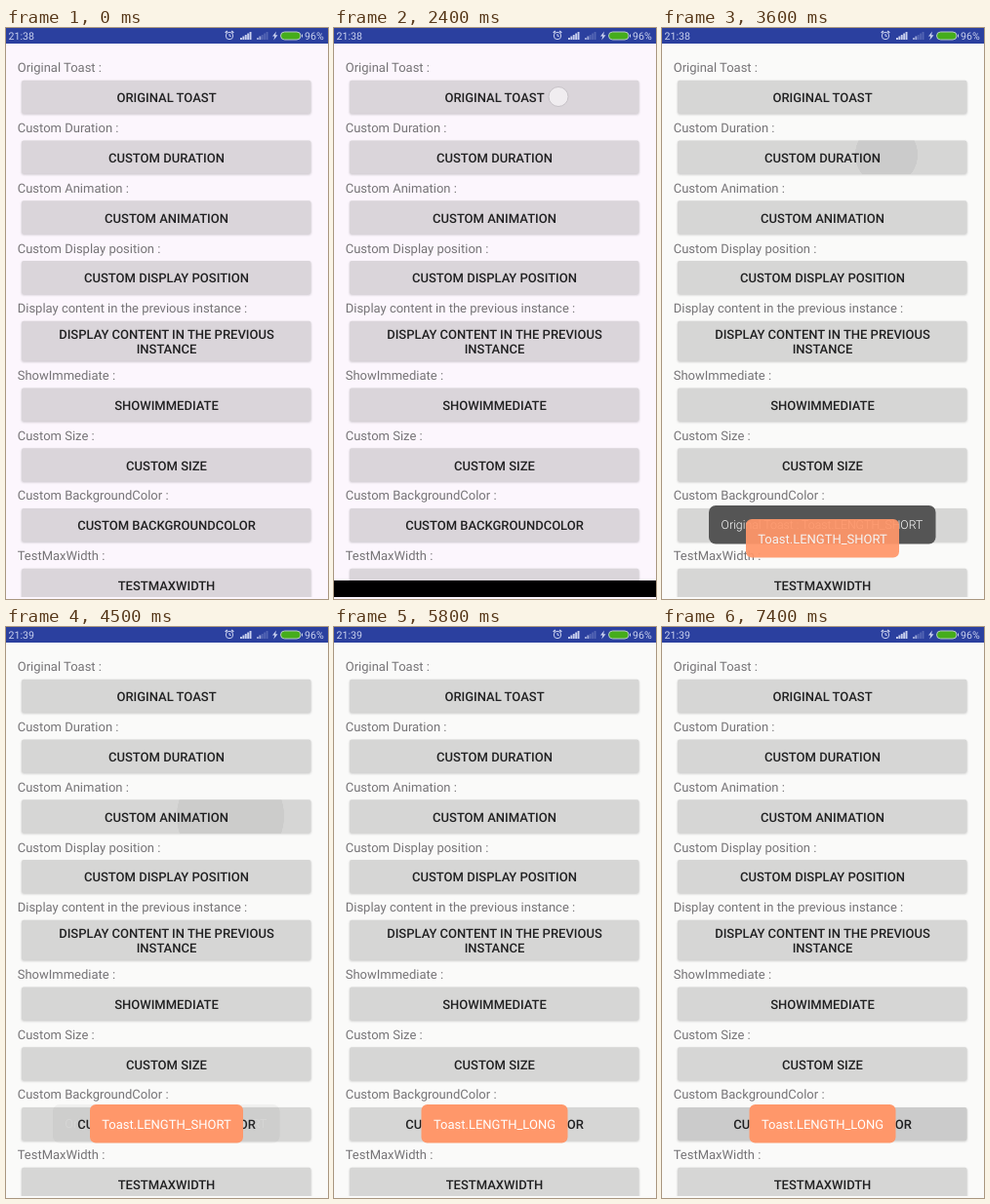
Write an HTML page that moves like this. It is 330 by 586 pixels and loops after 8 s.

```html
<!DOCTYPE html>
<html lang="en">
<head>
<meta charset="utf-8">
<title>Toast demo</title>
<style>
  html, body { margin: 0; width: 100%; height: 100%; overflow: hidden; background: #fafaf9; }
  svg { display: block; width: 330px; height: 586px; font: 13px Roboto, "Open Sans", sans-serif; text-rendering: geometricPrecision; }

  .page, .btn, .bar, .old, .new, .dot, .ripple, .plain, .short, .long, .press {
    animation: 8s step-end infinite;
  }
  .page { animation-name: page; }
  .btn { animation-name: btn; filter: drop-shadow(0 1px 1px rgba(0, 0, 0, .2)); }
  .bar { animation-name: bar; }
  .old { animation-name: old; }
  .new { animation-name: new; }
  .plain { animation-name: plain; }
  .short { animation-name: short; }
  .long { animation-name: long; }
  .press { animation-name: press; }
  .dot { animation-name: dot; animation-delay: calc(var(--start) - 8s); }
  .ripple { animation-name: ripple; animation-delay: calc(var(--start) - 8s); }

  .label { fill: #767477; }
  .cap { fill: #212122; font-weight: 500; text-anchor: middle; }
  .status { fill: #c9d0ee; font-size: 10.6px; }
  .mid { text-anchor: middle; fill: #fff; }
  .plain .mid { font-size: 12.3px; font-weight: 300; }

  @keyframes page { 0% { fill: #fcf6fd; } 31.25%, 100% { fill: #fafaf9; } }
  @keyframes btn { 0% { fill: #dad5da; } 31.25%, 100% { fill: #d6d6d5; } }
  @keyframes bar { 0% { opacity: 0; } 6.25% { opacity: 1; } 40%, 100% { opacity: 0; } }
  @keyframes old { 0% { opacity: 1; } 47.5%, 100% { opacity: 0; } }
  @keyframes new { 0% { opacity: 0; } 47.5%, 100% { opacity: 1; } }
  @keyframes press { 0% { opacity: 0; } 88.75% { opacity: .02; } 90% { opacity: .035; } 91.25%, 100% { opacity: .05; } }

  /* One touch, measured from its own start */
  @keyframes dot { 0% { opacity: 1; } 1.25% { opacity: .5; } 2.5%, 100% { opacity: 0; } }
  @keyframes ripple {
    0% { opacity: 0; transform: scale(0); }
    1.25% { opacity: .05; transform: scale(14); }
    2.5% { opacity: .05; transform: scale(32); }
    3.75% { opacity: .045; transform: scale(55); }
    5% { opacity: .035; transform: scale(110); }
    6.25% { opacity: .02; transform: scale(220); }
    7.5%, 100% { opacity: 0; transform: scale(220); }
  }

  @keyframes plain {
    0% { opacity: 0; }
    32.5% { opacity: .2; }
    33.75% { opacity: .5; }
    35% { opacity: .85; }
    36.25% { opacity: 1; }
    52.5% { opacity: .8; }
    53.75% { opacity: .55; }
    55% { opacity: .3; }
    56.25% { opacity: .06; }
    57.5%, 100% { opacity: 0; }
  }
  @keyframes short {
    0% { opacity: 0; transform: translateY(18px); }
    43.75% { opacity: .5; transform: translateY(18px); }
    45% { opacity: .94; transform: translateY(14px); }
    46.25% { opacity: 1; transform: translateY(8px); }
    47.5% { opacity: 1; transform: translateY(3px); }
    48.75% { opacity: 1; transform: none; }
    63.75% { opacity: .9; transform: translateY(3px); }
    65% { opacity: .6; transform: translateY(9px); }
    66.25% { opacity: .25; transform: translateY(15px); }
    67.5%, 100% { opacity: 0; transform: translateY(18px); }
  }
  @keyframes long {
    0% { opacity: 0; transform: translateY(18px); }
    67.5% { opacity: .5; transform: translateY(18px); }
    68.75% { opacity: .94; transform: translateY(14px); }
    70% { opacity: 1; transform: translateY(8px); }
    71.25% { opacity: 1; transform: translateY(3px); }
    72.5%, 100% { opacity: 1; transform: none; }
  }
</style>
</head>
<body>
<svg viewBox="0 0 330 586">
  <rect class="page" width="330" height="586"/>
  <g id="rows"></g>
  <g id="touches"></g>
  <rect class="press" x="16" y="493" width="296.5" height="34" rx="2"/>

  <g class="plain">
    <rect x="48" y="490" width="232.5" height="39.5" rx="7" fill="#555"/>
    <text class="mid" x="164" y="514">Original Toast : Toast.LENGTH_SHORT</text>
  </g>
  <g class="short">
    <rect x="86" y="490" width="157" height="39.5" rx="6" fill="#ff976a"/>
    <text class="mid" x="164.5" y="515">Toast.LENGTH_SHORT</text>
  </g>
  <g class="long">
    <rect x="89.5" y="490" width="150" height="39.5" rx="6" fill="#ff976a"/>
    <text class="mid" x="164.5" y="515">Toast.LENGTH_LONG</text>
  </g>

  <rect class="bar" y="567" width="330" height="17"/>
  <rect class="page" y="584" width="330" height="2"/>

  <rect width="330" height="16" fill="#2b409f"/>
  <g class="status">
    <text class="old" x="2.5" y="12">21:38</text>
    <text class="new" x="2.5" y="12">21:39</text>
    <text x="306" y="12">96%</text>
    <g fill="none" stroke="#c9d0ee">
      <circle cx="229" cy="8" r="3.7"/>
      <path d="M229 6v2.300h1.800"/>
      <path d="M224.800 5l2-2M233.200 5l-2-2" stroke-width="1.6"/>
      <rect x="281.5" y="4" width="20.5" height="8" rx="4" fill="#45ad1b" stroke="#b5c6c8"/>
      <path d="M303.500 6.500v3"/>
    </g>
    <path id="signal" d="M240 12v-2h1.900v2zM242.400 12v-3.500h1.900v3.500zM244.800 12v-5h1.900v5zM247.200 12v-6.500h1.900v6.500zM249.600 12v-8h1.900v8z"/>
    <use href="#signal" x="17" opacity=".25"/>
    <path d="M257 12v-2h1.900v2zM259.400 12v-3.500h1.900v3.500z" opacity=".6"/>
    <path d="M277 3.500l-4 5h2.300l-1 4 4.200-5.300h-2.400z"/>
  </g>
</svg>
<script>
  const rows = [
    ["Original Toast"], ["Custom Duration"], ["Custom Animation"], ["Custom Display position"],
    ["Display content in the previous instance", "Display content in the previous", "instance"],
    ["ShowImmediate"], ["Custom Size"], ["Custom BackgroundColor"], ["TestMaxWidth"]
  ];
  const pitch = 61.75, extra = 6.9, left = 16, width = 296.5;
  const topOf = i => 53.8 + i * pitch + (i > 4 ? extra : 0);

  const button = ([title, ...lines], i) => {
    const y = topOf(i);
    const caps = lines.length ? lines : [title];
    const height = 34 + (caps.length - 1) * extra;
    const text = caps.map((line, n) => {
      const base = y + (caps.length > 1 ? 18.2 + n * 14.9 : 22.4);
      return `<text class="cap" x="164.5" y="${Math.round(base)}">${line.toUpperCase()}</text>`;
    }).join("");
    return `<text class="label" x="11.7" y="${Math.round(y - 8.5)}">${title} :</text>
      <rect class="btn" x="${left}" y="${y}" width="${width}" height="${height}" rx="2"/>${text}`;
  };

  const touch = ([i, start, cy]) => `
    <clipPath id="clip${i}"><rect x="${left}" y="${topOf(i)}" width="${width}" height="34" rx="2"/></clipPath>
    <g style="--start:${start}s">
      <g clip-path="url(#clip${i})"><g transform="translate(230 ${cy})"><circle class="ripple" r="1"/></g></g>
      <circle class="dot" cx="230" cy="${cy}" r="10" fill="#f0edf0" stroke="#c6c2c7"/>
    </g>`;

  document.getElementById("rows").innerHTML = rows.map(button).join("");
  document.getElementById("touches").innerHTML =
    [[0, 2.4, 70.5], [1, 3.4, 130], [2, 4.2, 194]].map(touch).join("");
</script>
</body>
</html>
```
